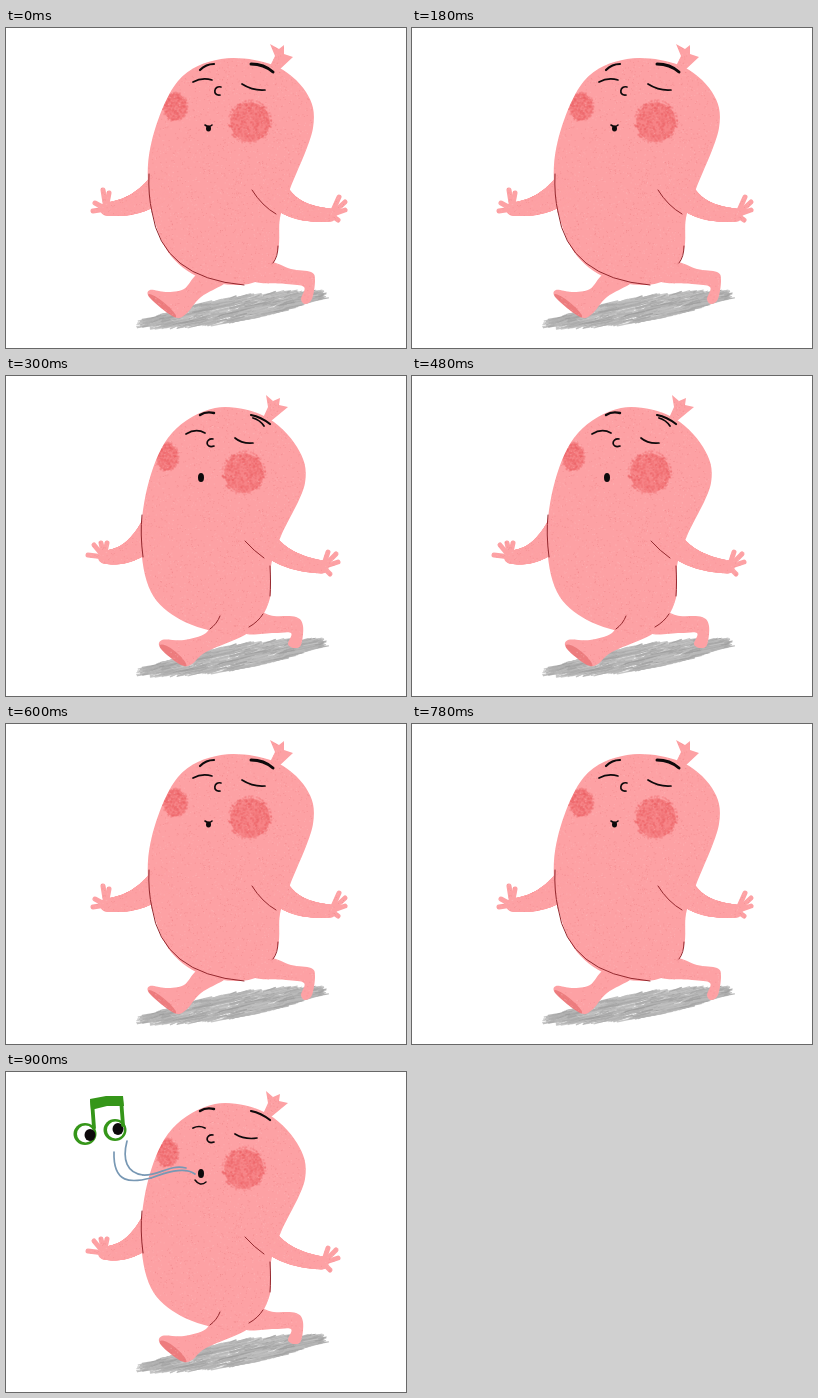
An HTML page with a canvas that plays this animation: 400 px wide and 320 px high, repeating every 1.2 s.

```html
<!DOCTYPE html>
<html lang="en">
<head>
<meta charset="utf-8">
<title>Whistling walk</title>
<style>
html, body { margin: 0; width: 100%; height: 100%; overflow: hidden; background: #fff; }
canvas { position: absolute; left: 0; top: 0; }
</style>
</head>
<body>
<canvas id="ground" width="400" height="320"></canvas>
<canvas id="figure" width="400" height="320"></canvas>
<script>
const context = id => document.getElementById(id).getContext('2d');
const ground = context('ground');
const ctx = context('figure');
ctx.lineCap = ctx.lineJoin = ground.lineCap = 'round';

const SKIN = '#fda1a4', SOLE = '#ed7c7e', CREASE = '#94272d';
const INK = '#0d090b', GREEN = '#359619', BLUE = '#7898b4';

let seed = 4271;
const rand = () => (seed = seed * 16807 % 2147483647) / 2147483647;

function polygon(color, ...points) {
  ctx.fillStyle = color;
  ctx.beginPath();
  points.forEach(p => ctx.lineTo(...p));
  ctx.fill();
}

// Closed smooth shape through all points
function blob(...points) {
  const n = points.length, at = i => points[(i + n) % n];
  const handle = (i, side) => at(i).map((v, k) => v + side * (at(i + 1)[k] - at(i - 1)[k]) / 6);
  ctx.fillStyle = SKIN;
  ctx.beginPath();
  ctx.moveTo(...points[0]);
  for (let i = 0; i < n; i++) {
    ctx.bezierCurveTo(...handle(i, 1), ...handle(i + 1, -1), ...at(i + 1));
  }
  ctx.fill();
}

function curve(color, width, start, ...rest) {
  ctx.strokeStyle = color;
  ctx.lineWidth = width;
  ctx.beginPath();
  ctx.moveTo(...start);
  if (rest.length === 3) ctx.bezierCurveTo(...rest.flat());
  else if (rest.length === 2) ctx.quadraticCurveTo(...rest.flat());
  else ctx.lineTo(...rest[0]);
  ctx.stroke();
}
const ink = (width, ...points) => curve(INK, width, ...points);
const crease = (...points) => curve(CREASE, 1, ...points);

function oval(color, x, y, rx, ry, turn = 0) {
  ctx.fillStyle = color;
  ctx.beginPath();
  ctx.ellipse(x, y, rx, ry, turn, 0, Math.PI * 2);
  ctx.fill();
}

// Arm narrowing towards the palm, with fingers
function arm([x0, y0], [cx, cy], [x1, y1], width, ...tips) {
  for (let t = 0; t <= 1; t += 0.01) {
    const s = 1 - t, r = 6.5 + (width - 6.5) * s;
    oval(SKIN, s * s * x0 + 2 * s * t * cx + t * t * x1, s * s * y0 + 2 * s * t * cy + t * t * y1, r, r);
  }
  tips.forEach(tip => curve(SKIN, 5, [x1, y1], tip));
}

function cheek(x, y, rx, ry) {
  oval('rgba(240,92,96,.42)', x, y, rx * 0.9, ry * 0.9);
  ctx.fillStyle = 'rgba(236,86,92,.25)';
  for (let i = 0; i < rx * 18; i++) {
    const a = rand() * Math.PI * 2, r = Math.sqrt(rand());
    ctx.fillRect(x + Math.cos(a) * rx * r - 1, y + Math.sin(a) * ry * r - 1, 2, 2);
  }
}

// Paper grain, sole and cheeks stay inside the silhouette
function shade(sole, ...cheeks) {
  ctx.globalCompositeOperation = 'source-atop';
  oval(SOLE, ...sole);
  cheeks.forEach(c => cheek(...c));
  for (let i = 0; i < 5200; i++) {
    ctx.fillStyle = rand() < 0.55 ? 'rgba(218,85,92,.2)' : 'rgba(255,205,205,.25)';
    ctx.fillRect(75 + rand() * 270, 15 + rand() * 278, 1, 1);
  }
  ctx.globalCompositeOperation = 'source-over';
}

function high() {
  polygon(SKIN, [264, 38], [269, 28], [264, 16], [273, 21], [278, 17], [278, 26], [287, 29], [272, 43]);
  blob([194, 245], [178, 261], [160, 264], [144, 262], [144, 270], [168, 289], [180, 286], [195, 269], [222, 252]);
  blob([262, 234], [285, 241], [305, 244], [309, 252], [306, 271], [299, 276], [295, 271], [298, 259], [280, 256], [248, 253]);
  blob([215, 31], [267, 37], [300, 64], [307, 100], [284, 161], [274, 190], [272, 222], [258, 249],
    [230, 257], [190, 248], [159, 219], [143, 165], [146, 112], [172, 53]);
  arm([155, 158], [132, 181], [100, 181], 14, [87, 183], [89, 175], [97, 162], [103, 165]);
  arm([269, 163], [285, 187], [325, 187], 13, [333, 169], [339, 174], [339, 182], [332, 192]);
  shade([156, 278, 18, 4, 0.69], [169, 79, 13, 15], [244, 94, 22, 22]);

  crease([246, 162], [256, 178], [270, 186]);
  crease([143, 146], [142, 167], [146, 184]);
  crease([146, 184], [156, 250], [238, 257]);
  crease([272, 218], [272, 229], [267, 235]);
  ink(2.2, [194, 42], [200, 36], [208, 36]);
  ink(3, [245, 36], [258, 36], [267, 44]);
  ink(1.7, [187, 54], [196, 49], [206, 52]);
  ink(1.7, [236, 56], [247, 63], [259, 62]);
  ink(1.7, [215, 59], [208, 57], [206, 68], [214, 67]);
  ink(1.6, [199, 97], [203, 100], [206, 97]);
  oval(INK, 202.5, 100.5, 2.5, 3);
}

function low(whistling) {
  polygon(SKIN, [257, 42], [262, 31], [260, 19], [267, 25], [274, 22], [273, 29], [282, 31], [265, 45]);
  blob([214, 239], [200, 257], [178, 264], [156, 264], [155, 273], [175, 289], [186, 288], [200, 276], [245, 254]);
  blob([251, 237], [268, 240], [290, 241], [297, 250], [295, 269], [288, 272], [282, 268], [285, 257], [268, 257], [239, 257]);
  blob([209, 32], [258, 40], [291, 71], [299, 107], [275, 160], [265, 190], [264, 222], [250, 247],
    [220, 257], [175, 244], [145, 216], [135, 165], [143, 105], [166, 57]);
  arm([148, 152], [127, 183], [98, 181], 14, [82, 179], [88, 169], [95, 167], [101, 167]);
  arm([255, 160], [274, 187], [317, 191], 12, [322, 176], [330, 178], [332, 186], [324, 198]);
  shade([167, 280, 17, 5, 0.69], [161, 81, 12, 15], [238, 97, 22, 22]);

  crease([239, 165], [248, 175], [258, 182]);
  crease([136, 139], [134, 158], [137, 181]);
  crease([214, 240], [211, 248], [204, 253]);
  crease([243, 251], [252, 246], [257, 238]);
  crease([264, 190], [265, 207], [264, 220]);
  ink(2.4, [194, 39], [200, 35], [208, 37]);
  ink(2.2, [245, 39], [255, 41], [264, 48]);
  ink(1.7, [207, 63], [199, 62], [199, 73], [208, 70]);
  if (whistling) {
    ink(1.7, [187, 56], [193, 53], [199, 56]);
    ink(1.7, [229, 62], [239, 68], [251, 66]);
    ink(1.5, [189, 108], [194, 115], [200, 110]);
  } else {
    ink(1.8, [247, 42], [254, 44], [258, 50]);
    ink(1.7, [180, 58], [190, 52], [199, 57]);
    ink(1.7, [229, 62], [236, 68], [247, 67]);
  }
  oval(INK, 195, 101.5, 3, 4.5);
}

function eye(x, y, px, py) {
  oval(GREEN, x, y, 11.5, 11);
  oval('#fff', x + 0.5, y, 8.5, 8.5);
  oval(INK, px, py, 5.5, 6);
}

function whistle() {
  low(true);
  curve(BLUE, 1.7, [189, 102], [178, 94], [158, 101], [145, 106]);
  curve(BLUE, 1.7, [145, 106], [125, 111], [107, 112], [108, 80]);
  curve(BLUE, 1.7, [180, 96], [163, 92], [153, 104], [137, 103]);
  curve(BLUE, 1.7, [137, 103], [121, 101], [116, 88], [121, 69]);
  eye(79, 62, 84, 63);
  eye(109, 58, 112, 57);
  curve(GREEN, 3.8, [86, 29], [88, 56]);
  curve(GREEN, 3.8, [115, 27], [117, 53]);
  polygon(GREEN, [84, 27], [100, 24], [117, 24], [118, 34], [101, 34], [85, 38]);
}

// Slanted pencil strokes, widest halfway along the ground
function shadow() {
  for (let i = 0; i < 750; i++) {
    const t = rand(), x = 142 + t * 170, half = 4 + rand() * 8;
    const y = 295 - t * 27 + (rand() - 0.5) * (7 + 72 * t * (1 - t));
    const grey = 155 + rand() * 45;
    ground.strokeStyle = `rgba(${grey}, ${grey}, ${grey}, .7)`;
    ground.lineWidth = 0.8 + rand();
    ground.beginPath();
    ground.moveTo(x - half, y + 2);
    ground.lineTo(x + half, y - 2);
    ground.stroke();
  }
}

const poses = [high, () => low(false), high, whistle];
let shown;
function tick() {
  const step = Math.floor(performance.now() % 1200 / 300);
  if (step !== shown) {
    shown = step;
    seed = 4271;
    ctx.clearRect(0, 0, 400, 320);
    poses[step]();
  }
  requestAnimationFrame(tick);
}
shadow();
tick();
</script>
</body>
</html>
```
